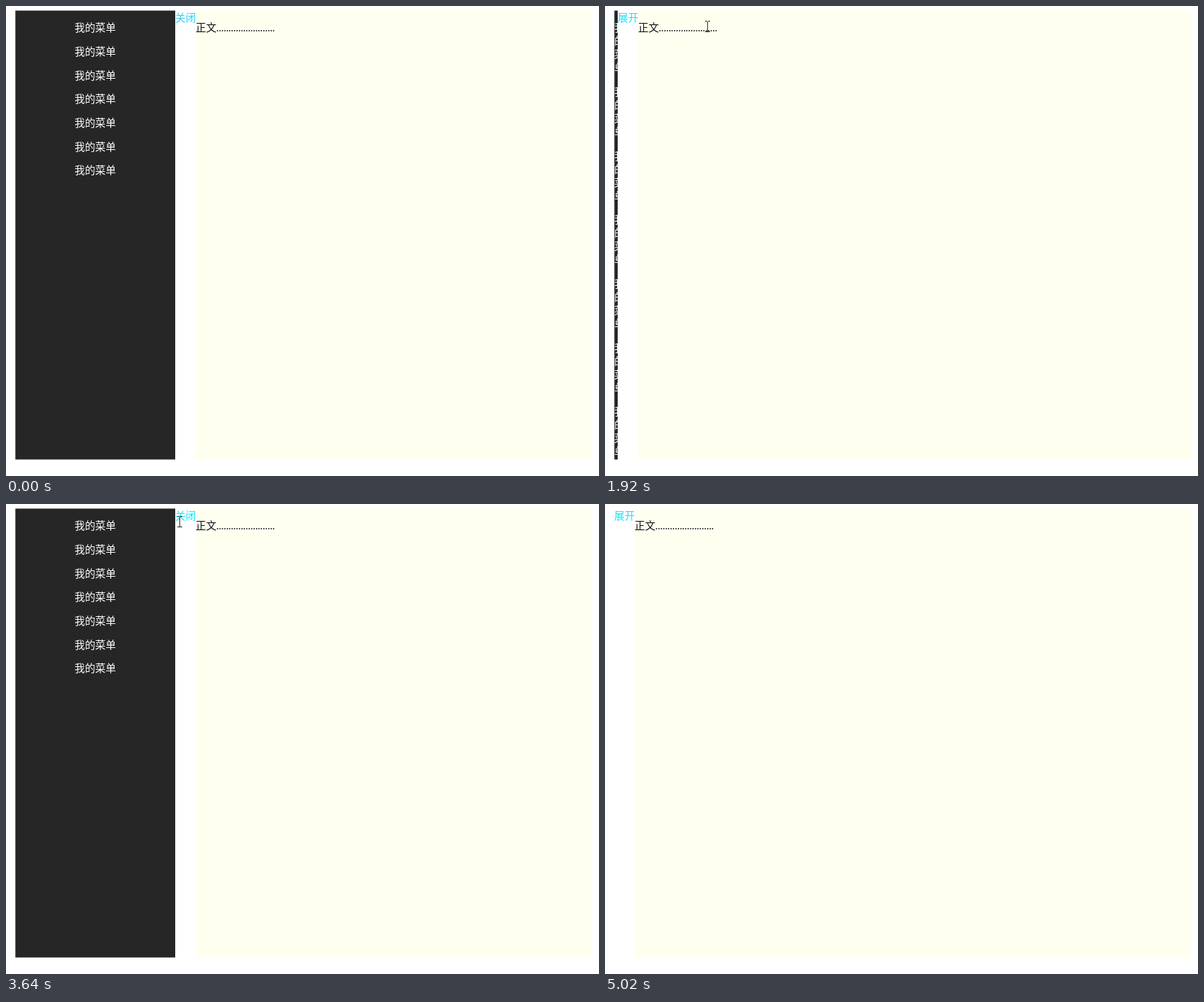
An HTML page with a canvas that plays this animation: 841x666 px, repeating every 5.49 s.

```html
<!DOCTYPE html>
<html lang="zh-CN">
<head>
<meta charset="utf-8">
<title>侧边菜单</title>
<style>
  html, body { margin: 0; width: 100%; height: 100%; overflow: hidden; background: #fff; }
  canvas { display: block; }
</style>
</head>
<body>
<canvas id="stage" width="841" height="666" lang="zh-CN"></canvas>
<script>
const ctx = document.getElementById('stage').getContext('2d', { alpha: false });
const LOOP = 5490, FIRST_TICK = 175, TICK = 69.14, SLIDE = 500 / TICK;
const LEFT = 13.3, TOP = 6.5, RIGHT = 831, BOTTOM = 642.6, MENU_WIDTH = 227;
const FONT_SIZE = 14.67, LINE = 19, LINK_WIDTH = 29;
const FONT = `${FONT_SIZE}px Lato, "Noto Sans CJK SC", "Noto Sans CJK", sans-serif`;
const MENU_LABEL = '我的菜单', BODY = '正文' + '.'.repeat(24);

const slides = [
  { at: 19, from: 19.07, open: false },
  { at: 40, from: 39.86, open: true },
  { at: 56, from: 56.07, open: false }
];
const clicks = [[16, 19, 256, 15.5], [38, 40, 27, 19], [55, 56, 256, 15.5]];
const pointerPath = [
  [0, 481, 494], [7, 247, 151], [11, 259, 22], [14, 257, 16], [19, 257, 16],
  [21, 226, 31], [26, 125, 28], [32, 29, 19], [40, 29, 19], [43, 167, 51],
  [46, 225, 44], [52, 257, 16], [56, 257, 16], [58, 248, 16], [60, 262, 40],
  [62, 330, 150], [69, 815, 648]
];

// CSS "ease": cubic-bezier(.25, .1, .25, 1)
function ease(x) {
  if (x <= 0) return 0;
  if (x >= 1) return 1;
  const bezier = (u, a, b) => 3 * u * (1 - u) ** 2 * a + 3 * u * u * (1 - u) * b + u ** 3;
  let low = 0, high = 1;
  for (let i = 0; i < 24; i++) {
    const mid = (low + high) / 2;
    if (bezier(mid, .25, .25) < x) low = mid; else high = mid;
  }
  return bezier(low, .1, 1);
}

function menuState(tick) {
  const slide = slides.filter(s => tick >= s.at).pop();
  if (!slide) return { width: MENU_WIDTH, open: true };
  const p = ease((tick - slide.from) / SLIDE);
  return { width: MENU_WIDTH * (slide.open ? p : 1 - p), open: slide.open };
}

function pointerAt(tick) {
  const next = pointerPath.findIndex(p => p[0] > tick);
  if (next < 1) return pointerPath[next < 0 ? pointerPath.length - 1 : 0].slice(1);
  const [t0, x0, y0] = pointerPath[next - 1], [t1, x1, y1] = pointerPath[next];
  const p = (tick - t0) / (t1 - t0);
  return [Math.round(x0 + (x1 - x0) * p), Math.round(y0 + (y1 - y0) * p)];
}

function rect(x, y, right, bottom, color) {
  ctx.fillStyle = color;
  ctx.fillRect(x, y, right - x, bottom - y);
}

function text(label, x, middle, color) {
  ctx.fillStyle = color;
  ctx.fillText(label, x, middle + 5.4);
}

function drawMenu(right) {
  const width = right - LEFT;
  const perLine = Math.max(1, Math.min(4, Math.floor(width / FONT_SIZE)));
  rect(LEFT, TOP, right, BOTTOM, '#262626');
  ctx.save();
  ctx.beginPath();
  ctx.rect(LEFT, TOP, width, BOTTOM - TOP);
  ctx.clip();
  let y = 31;
  for (let item = 0; item < 7; item++) {
    for (let i = 0; i < MENU_LABEL.length; i += perLine) {
      const part = MENU_LABEL.slice(i, i + perLine);
      text(part, LEFT + Math.max(0, (width - part.length * FONT_SIZE) / 2), y, '#fff');
      y += LINE;
    }
    y += FONT_SIZE;
  }
  ctx.restore();
}

function drawClick(x, y) {
  ctx.fillStyle = 'rgba(255, 255, 0, .62)';
  ctx.beginPath();
  ctx.arc(x, y, 10.3, 0, Math.PI * 2);
  ctx.fill();
}

function drawArrow(x, y) {
  const outline = [[0, 0], [0, 15], [3.5, 12], [6, 17.5], [8.5, 16.5], [6, 11], [10.5, 11]];
  ctx.beginPath();
  outline.forEach(([dx, dy]) => ctx.lineTo(x + .5 + dx, y + .5 + dy));
  ctx.closePath();
  ctx.fillStyle = '#fff';
  ctx.fill();
  ctx.strokeStyle = '#20203a';
  ctx.lineWidth = 1;
  ctx.stroke();
}

function drawBeam(x, y) {
  const ink = '#2a2a2a';
  rect(x, y - 7, x + 1, y + 8, ink);
  for (const end of [y - 8, y + 7]) {
    rect(x - 3, end, x, end + 1, ink);
    rect(x + 1, end, x + 4, end + 1, ink);
  }
}

function drawPointer(tick, linkX, bodyX) {
  const [x, y] = pointerAt(tick);
  const onLink = x >= linkX && x <= linkX + LINK_WIDTH && y >= 7 && y <= 28;
  const onBody = x >= bodyX && x <= bodyX + 113 && y >= 21 && y <= 41;
  (onLink || onBody ? drawBeam : drawArrow)(x, y);
}

function draw(time) {
  const tick = Math.floor((time % LOOP - FIRST_TICK) / TICK);
  const { width, open } = menuState(tick);
  const linkX = Math.round(LEFT + width), bodyX = linkX + LINK_WIDTH;

  rect(0, 0, 841, 666, '#fff');
  ctx.font = FONT;
  if (linkX > LEFT) drawMenu(linkX);
  rect(bodyX, TOP, RIGHT, BOTTOM, '#feffee');
  text(open ? '关闭' : '展开', linkX, 17, tick < 19 ? '#35c9f2' : '#14e6fa');
  text(BODY, bodyX, 31, '#10101c');

  for (const [from, to, x, y] of clicks) {
    if (tick >= from && tick < to) drawClick(x, y);
  }
  if (tick >= 0 && tick < 70) drawPointer(tick, linkX, bodyX);
}

const start = performance.now();
function frame() {
  draw(performance.now() - start);
  requestAnimationFrame(frame);
}
frame();
</script>
</body>
</html>
```
